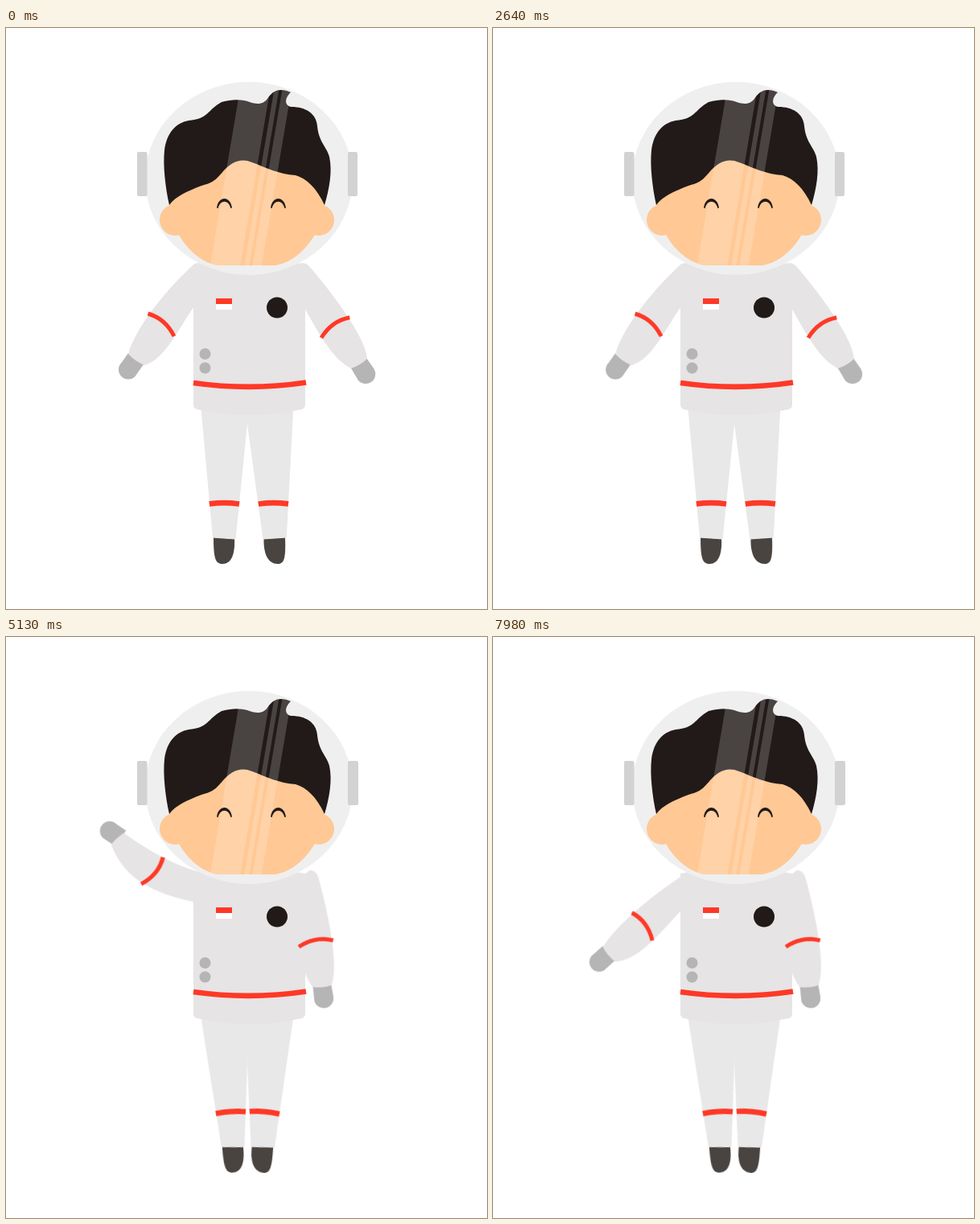
An HTML page without scripts for the animation above (8 s loop, 598 px wide and 722 px high).

```html
<!DOCTYPE html>
<html lang="en">
<head>
<meta charset="utf-8">
<title>Waving astronaut</title>
<style>
  html, body { margin: 0; width: 100%; height: 100%; overflow: hidden; background: #fff; }
  svg { display: block; width: 100%; height: 100%; }

  .suit { fill: #e6e4e5; }
  .pants { fill: #e8e8e8; }
  .boot { fill: #494440; }
  .glove { fill: #b5b5b5; }
  .pad { fill: #d2d2d2; }
  .skin { fill: #ffc894; }
  .dark { fill: #211a18; }
  .trim { fill: none; stroke: #ff3826; stroke-width: 5; }
  .wide { stroke-width: 6.8; }

  /* limbs are drawn spread out; --hang turns them to the resting pose */
  .swing { animation: swing 8s infinite; }
  .arm-l { --hang: -30deg; --lead: -2px, -1.6px; transform-origin: 233px 325px; }
  .arm-r { --hang: 25deg; --lead: 3.2px, -2.2px; transform-origin: 378px 322px; }
  .leg-l { --hang: -3.8deg; transform-origin: 270px 470px; }
  .leg-r { --hang: 5.2deg; transform-origin: 330px 470px; }
  .wave { transform-origin: 233px 325px; animation: wave 8s infinite; }
  .upper { animation: lead 8s infinite; }
  .sleeve { animation: bend 8s infinite; }
  .band { animation: band 8s infinite; }
  .pad-r { animation: pad 8s step-end infinite; }

  @keyframes swing {
    0% { transform: rotate(0deg); animation-timing-function: cubic-bezier(.333, 0, .667, 1); }
    3.75% { transform: rotate(var(--hang)); }
    15% { transform: rotate(var(--hang)); animation-timing-function: cubic-bezier(.5, 0, .6, 1); }
    33.75% { transform: rotate(0deg); animation-timing-function: cubic-bezier(.333, 0, .667, 1); }
    37.5%, 100% { transform: rotate(var(--hang)); }
  }
  /* the sleeve sets off a little before the hand */
  @keyframes lead {
    0%, 15% { transform: translate(0, 0); }
    18.5% { transform: translate(var(--lead)); }
    30%, 100% { transform: translate(0, 0); }
  }
  @keyframes wave {
    0%, 48.75% { transform: translate(0, 0) rotate(0deg); animation-timing-function: cubic-bezier(.4, 0, .75, .55); }
    55.125% { transform: translate(0, 0) rotate(31.6deg); animation-timing-function: linear; }
    58.875% { transform: translate(-1px, 0) rotate(65deg); animation-timing-function: cubic-bezier(.3, .345, .6, 1); }
    67.5% { transform: translate(-3px, -7px) rotate(132deg); animation-timing-function: cubic-bezier(.333, 0, .667, 1); }
    73.125% { transform: translate(-1px, -1px) rotate(98deg); animation-timing-function: cubic-bezier(.333, 0, .667, 1); }
    78.75% { transform: translate(-3px, -6px) rotate(127deg); animation-timing-function: cubic-bezier(.333, 0, .667, 1); }
    84.375% { transform: translate(-1px, -1px) rotate(98deg); animation-timing-function: cubic-bezier(.333, 0, .667, 1); }
    90% { transform: translate(-3px, -6px) rotate(128deg); animation-timing-function: cubic-bezier(.45, 0, .75, .7); }
    99.75% { transform: translate(0, 0) rotate(43deg); animation-timing-function: linear; }
    100% { transform: translate(0, 0) rotate(40.4deg); }
  }
  @keyframes bend {
    0%, 52% { d: path("M231 296 Q236 290 244 293 L262 330 L234 346 C215 372 198 412 172 419 Q160 414 152 405 C162 369 204 321 231 296 Z"); }
    66% { d: path("M206 313 Q212 306 240 300 L258 312 L243 322 C228 385 205 410 169 423 Q162 418 155 407 C180 375 199 340 206 313 Z"); }
    90% {
      d: path("M206 313 Q212 306 240 300 L258 312 L243 322 C228 385 205 410 169 423 Q162 418 155 407 C180 375 199 340 206 313 Z");
      animation-timing-function: cubic-bezier(.3, 0, 1, .5);
    }
    100% { d: path("M231 296 Q236 290 244 293 L262 330 L234 346 C215 372 198 412 172 419 Q160 414 152 405 C162 369 204 321 231 296 Z"); }
  }
  @keyframes band {
    0%, 52% { transform: translate(0, 0); }
    66% { transform: translate(10px, 4px); }
    90% { transform: translate(10px, 4px); animation-timing-function: cubic-bezier(.3, 0, 1, .5); }
    100% { transform: translate(0, 0); }
  }
  @keyframes pad {
    0% { width: 12px; }
    2% { width: 13px; }
    22% { width: 12px; }
    36%, 100% { width: 13px; }
  }
</style>
</head>
<body>
<svg viewBox="0 0 598 722" preserveAspectRatio="none">
  <defs>
    <path id="hair" d="M203 220 C198 198 195 170 197 152 C200 130 211 118 227 115 C252 113 250 102 268 92
      C283 88 291 89 300 91 C310 95 319 96 325 88 C333 75 343 75 354 80 C346 87 346 97 355 98
      C372 98 386 106 387 122 C389 142 399 148 402 160 C406 178 402 200 396 220
      C386 199 374 187 360 183 C340 182 322 173 306 167 C292 161 281 166 270 178
      C260 190 257 192 243 196 C225 203 211 209 203 220 Z"/>
    <path id="face" d="M203 219 C206 250 227 287 262 295 H335 C368 289 393 253 396 219 L365 165 H245 Z"/>
    <clipPath id="head"><use href="#hair"/><use href="#face"/></clipPath>
    <path id="eye" d="M262 223.5 C264 208 279 208 281 223.5 L279.3 224 C277 213 266 213 263.7 224 Z"/>
  </defs>

  <g class="swing leg-l">
    <path class="boot" d="M258 633 L284 635 C285 654 280 666 269 666 C260 666 258 658 258 633 Z"/>
    <path class="pants" d="M242 468 L257 633.5 L285.5 635.5 L300 492 V468 Z"/>
    <path class="trim wide" d="M252.8 591.3 Q272 588.8 290 591.5"/>
  </g>
  <g class="swing leg-r">
    <path class="boot" d="M320.5 635 L347 633 C348 658 346 666 338 666 C326 666 320 654 320.5 635 Z"/>
    <path class="pants" d="M300 468 V492 L319.5 635.5 L348.8 633.5 L357.5 468 Z"/>
    <path class="trim wide" d="M313.8 591.5 Q332 588.8 351 591.3"/>
  </g>

  <path class="suit" d="M233 294 Q300 280 372 294 V468 Q372 473 367 474 Q303 488 238 474 Q233 473 233 468 Z"/>
  <path class="trim wide" d="M233 441 Q303 451 373 440.5"/>
  <g class="glove">
    <circle cx="247.5" cy="405" r="7"/>
    <circle cx="247.5" cy="422.5" r="7"/>
  </g>
  <path fill="#fff" d="M261 343h20v7h-20z"/>
  <path fill="#ff3826" d="M261 336h20v7h-20z"/>
  <circle class="dark" cx="337" cy="347.5" r="13"/>

  <g class="wave">
    <g class="swing arm-l">
      <path class="glove" d="M152 404 L143.5 416 A12 12 0 0 0 160.5 433 L171 418 Z"/>
      <g class="upper">
        <path class="suit sleeve" d="M231 296 Q236 290 244 293 L262 330 L234 346 C215 372 198 412 172 419 Q160 414 152 405 C162 369 204 321 231 296 Z"/>
        <path class="trim band" d="M176.5 355 Q198 361 209 383"/>
      </g>
    </g>
  </g>
  <g class="swing arm-r">
    <path class="glove" d="M428.5 422 L438 438 A12.2 12.2 0 0 0 457.5 423.5 L448 410 Z"/>
    <g class="upper">
      <path class="suit" d="M377 296 Q371 290 364 293 L346 330 L370 346 C385 372 405 412 429 423 Q441 419 449 411 C448 385 404 327 377 296 Z"/>
      <path class="trim" d="M392 385 Q405 364 427.3 359.8"/>
    </g>
  </g>

  <ellipse cx="302" cy="187" rx="129" ry="120" fill="#efefef"/>
  <rect class="pad" x="163" y="154" width="12.5" height="55" rx="2"/>
  <rect class="pad pad-r" x="425" y="154" width="12" height="55" rx="2"/>

  <g class="skin">
    <circle cx="210.5" cy="238.5" r="19.5"/>
    <circle cx="388.5" cy="238.5" r="19.5"/>
    <use href="#face"/>
  </g>
  <use class="dark" href="#hair"/>
  <path clip-path="url(#head)" fill="#fff" fill-opacity=".18" d="M292 70 h37.5 L291 297 h-37.5 Z
    M334.5 70 h6 L302 297 h-6 Z M344.5 70 h11.5 L317.5 297 h-11.5 Z"/>
  <g class="dark">
    <use href="#eye"/>
    <use href="#eye" x="67"/>
  </g>
</svg>
</body>
</html>
```
